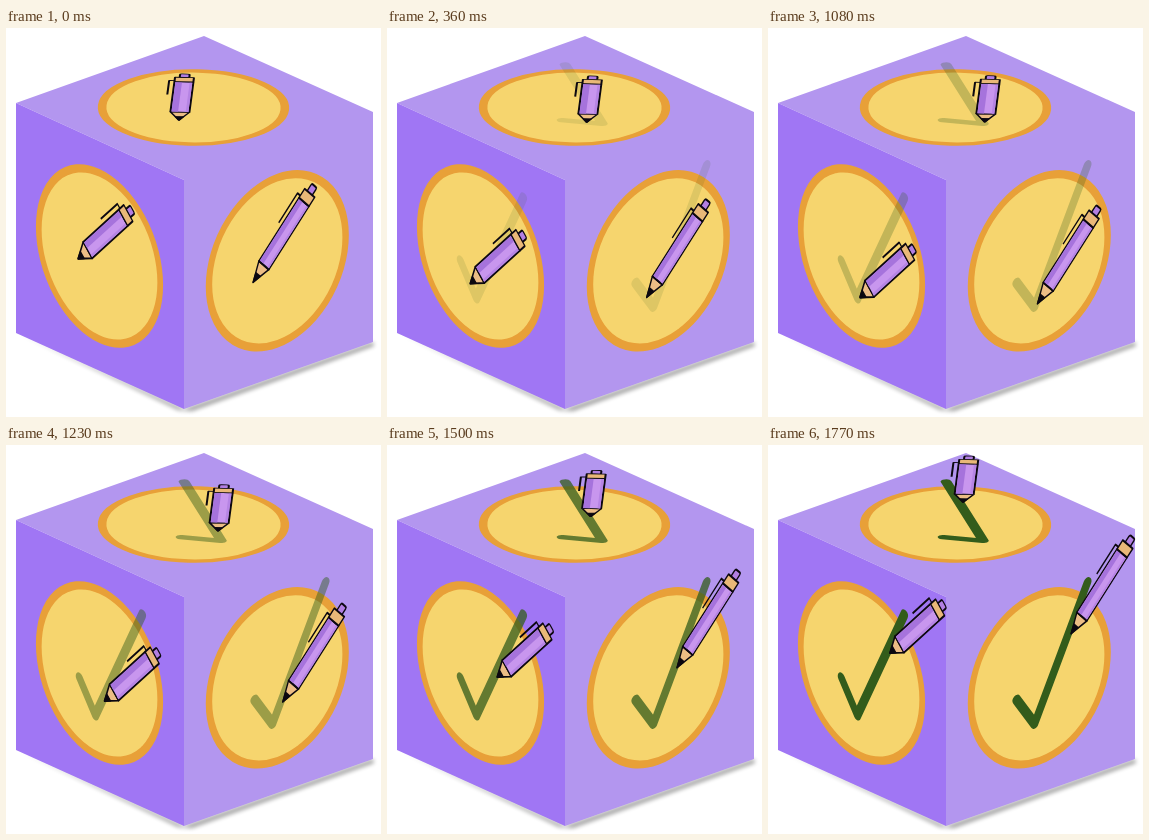
An HTML page that plays this animation: 375x389 px, repeating every 1.8 s.

```html
<!DOCTYPE html>
<html lang="en">
<head>
<meta charset="utf-8">
<title>Pen cube</title>
<style>
  html, body { margin: 0; width: 100%; height: 100%; overflow: hidden; background: #fff; }
  svg { display: block; width: 375px; height: 389px; }
</style>
</head>
<body>
<svg viewBox="0 0 375 389">
  <defs>
    <filter id="blur" x="-10%" y="-10%" width="120%" height="120%">
      <feGaussianBlur stdDeviation="2"/>
    </filter>
    <!-- One face design, drawn in a square from -100 to 100 -->
    <g id="disc">
      <circle r="72.3" fill="#f6d56e" stroke="#e8a038" stroke-width="6.8"/>
    </g>
    <path id="check" d="M-24 12L-5 38.5L51 -68" fill="none" stroke="#335c1b"
      stroke-width="8.6" stroke-linecap="round" stroke-linejoin="round"/>
    <!-- Pen lies along +x with its point at the origin -->
    <g id="pen" transform="rotate(-45)" stroke="#0c0810" stroke-width="1.6" stroke-linejoin="round">
      <rect x="84" y="-3.8" width="7.5" height="7.6" rx="1.5" fill="#b27fe2"/>
      <path d="M0 0L16 -7.5V7.5Z" fill="#ecbd85"/>
      <path d="M0 0L7 -3V3Z" fill="#0c0810"/>
      <rect x="16" y="-7.5" width="60" height="15" fill="#c896ee"/>
      <rect x="16.8" y="-6.7" width="58.4" height="5.2" fill="#a673dc" stroke="none"/>
      <rect x="16.8" y="4.6" width="58.4" height="2.1" fill="#b684e4" stroke="none"/>
      <rect x="76" y="-7.5" width="8.5" height="15" fill="#e9b878"/>
      <path d="M50 -11.8H78V-7.5" fill="none"/>
    </g>
  </defs>
  <path d="M12 305L178 381L367 314L368 318L186 383L172 382Z" fill="#000" opacity=".38" filter="url(#blur)"/>
  <path d="M10 75L198 8L367 84V314L178 381V152Z" fill="#b396ef"/>
  <path d="M10 75L178 152V381L10 305Z" fill="#a076f4"/>
  <g id="faces"></g>
</svg>
<script>
  const LOOP = 1800, STEP = 30;
  const REST = 20, LAST = 44, REST_END = 1080;
  const START = [-25.5, 11], CORNER = [-3.4, 39.5], END = [33.8, -28.6];

  const planes = [
    "matrix(.94 -.335 .845 .38 187.5 79.5)",
    "matrix(.84 .385 0 1.15 93.5 228)",
    "matrix(.945 -.34 0 1.15 271.3 232.8)"
  ];
  const faces = document.getElementById("faces");
  faces.innerHTML = planes.map(m => `<g transform="${m}">
    <use href="#disc"/><use class="check" href="#check"/>
    <g class="pen"><use href="#pen"/></g></g>`).join("");
  const checks = faces.querySelectorAll(".check");
  const pens = faces.querySelectorAll(".pen");

  const mix = (a, b, p) => a + (b - a) * p;

  function stepAt(t) {
    if (t < REST_END) return Math.min(REST, Math.floor(t / STEP));
    return Math.min(LAST, REST + 1 + Math.floor((t - REST_END) / STEP));
  }

  function draw(t) {
    const k = stepAt(t);
    const down = k <= REST;
    const p = down ? k / REST : (k - REST) / (LAST - REST);
    const [from, to] = down ? [START, CORNER] : [CORNER, END];
    const x = mix(from[0], to[0], p), y = mix(from[1], to[1], p);
    const alpha = down ? 0.2 * p : mix(0.2, 1, p ** 0.8);
    pens.forEach(pen => pen.setAttribute("transform", `translate(${x} ${y})`));
    checks.forEach(check => check.setAttribute("opacity", alpha));
  }

  const begin = performance.now();
  function tick() {
    draw((performance.now() - begin) % LOOP);
    requestAnimationFrame(tick);
  }
  draw(0);
  requestAnimationFrame(tick);
</script>
</body>
</html>
```
